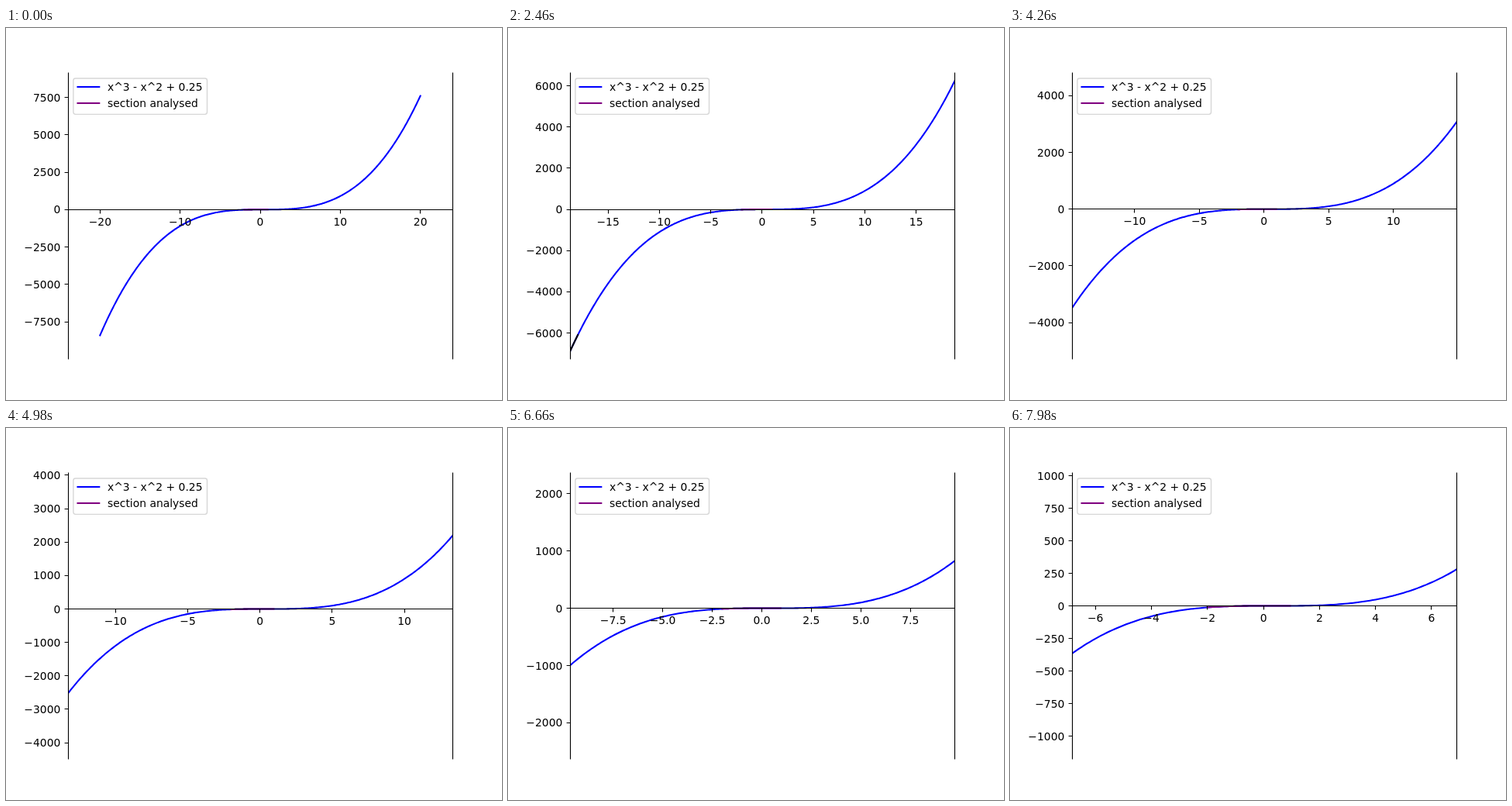
Write an HTML page that moves like this. It is 640 by 480 pixels and loops after 8 s.

```html
<!DOCTYPE html>
<html lang="en">
<head>
<meta charset="utf-8">
<title>Cubic zoom</title>
<style>
  html, body { margin: 0; width: 100%; height: 100%; overflow: hidden; background: #fff; }
  svg { display: block; }
  text { font: 13.889px "DejaVu Sans", sans-serif; fill: #000; white-space: pre; }
  .line { fill: none; stroke-width: 2.083; stroke-linecap: square; stroke-linejoin: round; }
  .axis { fill: none; stroke: #000; stroke-width: 1.111; }
</style>
</head>
<body>
<svg width="640" height="480" viewBox="0 0 640 480">
  <clipPath id="box"><rect x="80" y="57.6" width="496" height="369.6"/></clipPath>
  <g clip-path="url(#box)">
    <path id="curve" class="line" stroke="#00f"/>
    <path id="section" class="line" stroke="#800080"/>
    <path id="trace" class="line" stroke="#000"/>
  </g>
  <path id="axes" class="axis"/>
  <g id="labels"></g>
  <rect x="86.9" y="65" width="172.6" height="46.4" rx="2.8" fill="#fff" fill-opacity=".8"
        stroke="#ccc" stroke-opacity=".8" stroke-width="1.389"/>
  <path class="line" stroke="#00f" d="M92.5 76H120.3"/>
  <path class="line" stroke="#800080" d="M92.5 97H120.3"/>
  <text x="131" y="81">x^3 - x^2 + 0.25</text>
  <text x="131" y="102">section analysed</text>
</svg>
<script>
const LOOP = 8000, STEP = 60;
const L = 80, R = 576, T = 57.6, B = 427.2;
const $ = id => document.getElementById(id);
const f = x => x ** 3 - x ** 2 + 0.25;
const snap = v => Math.floor(v + 1e-6) + 0.5;

// Smallest "nice" step giving at most nine intervals
function ticks(lo, hi) {
  const raw = (hi - lo) / 9;
  const scale = 10 ** Math.floor(Math.log10(raw));
  const step = scale * [1, 2, 2.5, 5, 10].find(s => s * scale >= raw);
  const digits = step % 1 ? 1 : 0;
  const list = [];
  for (let k = Math.ceil(lo / step); k * step <= hi; k++) {
    const text = Math.abs(k * step).toFixed(digits);
    list.push({ v: k * step, text: (k < 0 ? "\u2212" : "") + text });
  }
  return list;
}

const label = (x, y, anchor, text) =>
  `<text x="${x}" y="${y}" text-anchor="${anchor}">${text}</text>`;

function draw(n) {
  const x0 = -24 + 0.12906 * n, x1 = 24 - 0.12868 * n;
  const y0 = -9987 + 66.25 * n, y1 = 9149 - 61.1 * n;
  const px = x => L + (x - x0) / (x1 - x0) * (R - L);
  const py = y => T + (y1 - y) / (y1 - y0) * (B - T);

  const plot = (a, b) => {
    const count = Math.max(1, Math.ceil((b - a) / 0.1));
    const pts = [];
    for (let i = 0; i <= count; i++) {
      const x = a + (b - a) * i / count;
      pts.push(px(x).toFixed(2) + " " + py(f(x)).toFixed(2));
    }
    return "M" + pts.join("L");
  };

  $("curve").setAttribute("d", plot(-20, 20));
  $("section").setAttribute("d", plot(-2, 0.95));
  $("trace").setAttribute("d", n ? plot(-20, -20 + 0.05 * n) : "");

  const zero = snap(py(0));
  let d = `M80.5 57.5V427.5M576.5 57.5V427.5M80 ${zero}H577`;
  let text = "";
  for (const t of ticks(x0, x1)) {
    const x = px(t.v);
    d += `M${snap(x)} ${zero}v4.9`;
    text += label(x.toFixed(2), zero + 20.5, "middle", t.text);
  }
  for (const t of ticks(y0, y1)) {
    const y = py(t.v);
    d += `M80.5 ${snap(y)}h-4.9`;
    text += label(70.3, Math.round(y + 5.1), "end", t.text);
  }
  $("axes").setAttribute("d", d);
  $("labels").innerHTML = text;
}

let start, last = -1;
function tick(now) {
  start ??= now;
  const n = Math.floor((now - start) % LOOP / STEP);
  if (n !== last) draw(last = n);
  requestAnimationFrame(tick);
}
draw(0);
requestAnimationFrame(tick);
</script>
</body>
</html>
```
